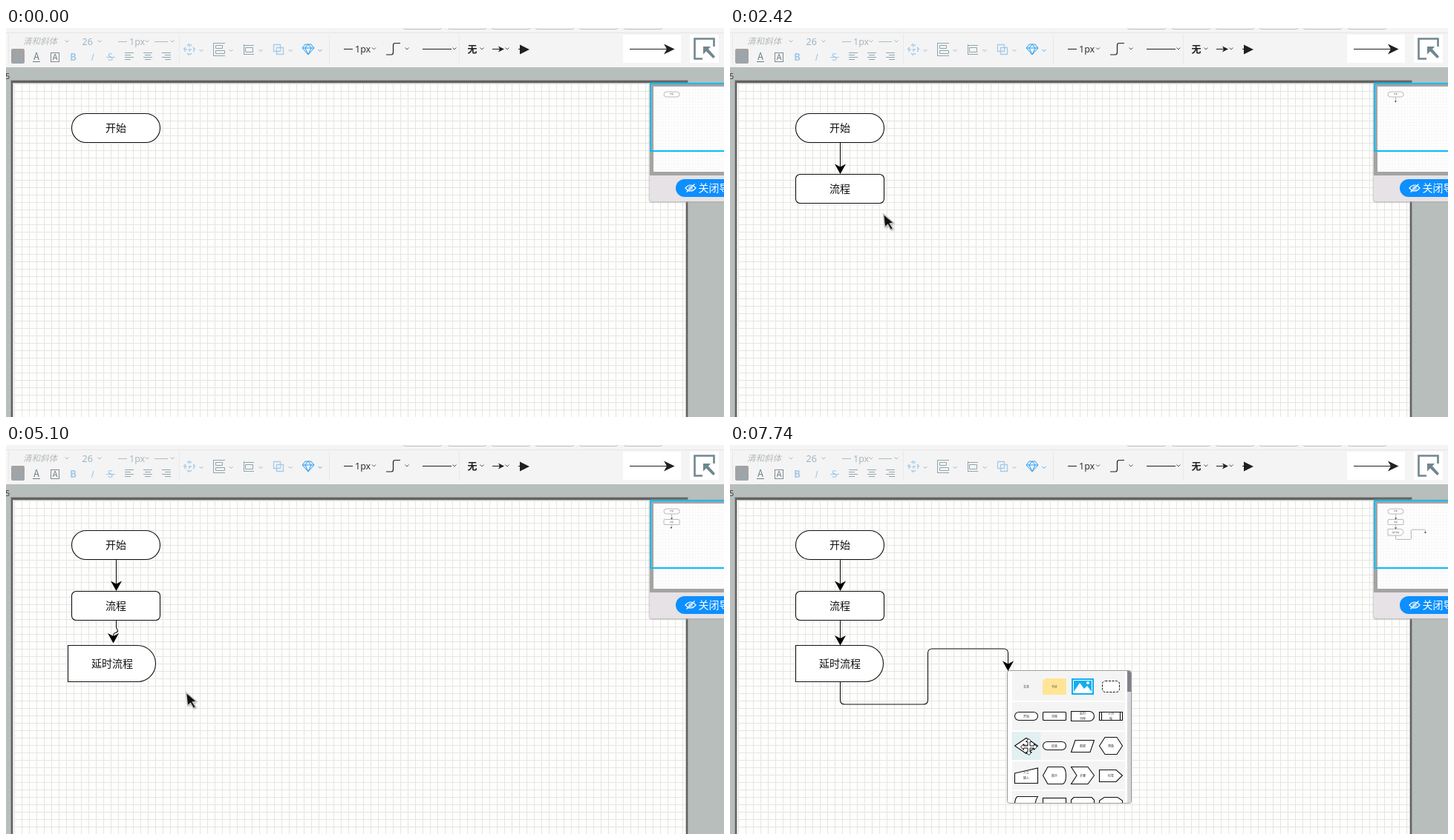
Write an HTML page that moves like this. It is 967 px wide and 525 px high and loops after 8 s.

```html
<!DOCTYPE html>
<html lang="zh-CN">
<head>
<meta charset="utf-8">
<title>Flowchart editor</title>
<style>
html, body { margin: 0; width: 100%; height: 100%; overflow: hidden; background: #b8bebc; }
svg { display: block; }
text { font-family: "Noto Sans CJK SC", "Noto Sans CJK", "Noto Sans", sans-serif; }
.line { fill: none; stroke: #111; stroke-width: 1.1; }
.node { fill: #fff; stroke: #111; stroke-width: 1.1; }
.label { font-size: 14px; text-anchor: middle; fill: #111; }
.hover { fill: none; stroke: #18b4f0; stroke-dasharray: 3 2; }
.anchor { fill: #fff; stroke: #3a7ea8; }
#mini .line, #mini .node { stroke: #999; stroke-width: .7; vector-effect: non-scaling-stroke; }
#mini .label { fill: #555; }
#menu .icon { fill: #fff; stroke: #111; stroke-width: 1.1; }
#menu text { font-size: 4px; text-anchor: middle; fill: #333; }
.pale { fill: none; stroke: #a9bcc8; }
.teal { fill: none; stroke: #8fa5ad; stroke-width: 1; }
.sky { fill: none; stroke: #a5cbe9; stroke-width: 1.3; }
.ink { fill: none; stroke: #231f20; stroke-width: 1.2; }
.en { font-family: "Noto Sans", sans-serif; font-size: 12.5px; }
</style>
</head>
<body>
<svg width="967" height="525" viewBox="0 0 967 525">
  <defs>
    <pattern id="grid" x="11" y="75" width="10" height="10" patternUnits="userSpaceOnUse">
      <path d="M.5 0V10M0 .5H10" stroke="#e5e5e2" fill="none"/>
    </pattern>
    <pattern id="dots" x="872" y="79" width="4" height="4" patternUnits="userSpaceOnUse">
      <path d="M.5 0V4M0 .5H4" stroke="#f8f8f8" fill="none"/>
    </pattern>
    <clipPath id="menuClip"><rect x="0" y="1" width="166" height="178" rx="3"/></clipPath>
    <filter id="soft" x="-50%" y="-50%" width="200%" height="200%"><feGaussianBlur stdDeviation="1"/></filter>
  </defs>

  <!-- page -->
  <rect width="967" height="525" fill="#b8bebc"/>
  <text class="en" x="-1" y="69" style="font-size:11px" fill="#444">5</text>
  <rect x="6" y="70" width="913" height="480" fill="#9a9f9d"/>
  <rect x="7" y="71" width="911" height="480" fill="#606261"/>
  <rect x="9" y="74" width="907" height="480" fill="#c9c9c9"/>
  <rect x="10" y="75" width="905" height="480" fill="#fefefd"/>
  <rect x="11" y="75" width="904" height="480" fill="url(#grid)"/>

  <!-- toolbar -->
  <rect width="967" height="53" fill="#f4f4f4"/>
  <path d="M0 6.5H967" stroke="#e6e6e6"/>
  <path d="M3.5 8V48M233.5 8V48M435.5 8V48M610.5 8V48" stroke="#e9e9e9"/>
  <g id="tabs" fill="#fdfdfd" stroke="#bbb"></g>
  <g id="chevrons" fill="none"></g>
  <text x="23" y="22" font-size="11.5" font-style="italic" fill="#b3b8ba">清和斜体</text>
  <text class="en" x="102.500" y="23" fill="#9db3c2">26</text>
  <text class="en" x="166" y="23" fill="#adb8be">1px</text>
  <path class="pale" d="M151 18.500H163M200 18.500H218"/>
  <rect x="7" y="28" width="18" height="20" rx="2" fill="#a3a3a4"/>
  <path d="M11 38L15 33.500L19 38L15 42.500ZM20.500 40V43M11 44.500H21" fill="none" stroke="#86aecb"/>
  <g class="en" text-anchor="middle">
    <text x="41" y="43" fill="#6c7a82">A</text>
    <text x="66" y="43" style="font-size:11px" fill="#6c7a82">A</text>
    <text x="90.500" y="44" fill="#9fc6e6" font-weight="600">B</text>
    <text x="115.500" y="44" fill="#9fc6e6" font-style="italic">I</text>
    <text x="140.500" y="44" fill="#9fc6e6">S</text>
  </g>
  <path d="M36 45.500H46" stroke="#6c7a82"/>
  <path d="M135 39.500H147" stroke="#9fc6e6"/>
  <rect x="60.500" y="33.500" width="11" height="12" fill="none" stroke="#7d8a91"/>
  <path class="teal" d="M160 33.500H172M160 36.500H168M160 39.500H172M160 42.500H168M185 33.500H197M187 36.500H195M185 39.500H197M187 42.500H195M210 33.500H222M214 36.500H222M210 39.500H222M214 42.500H222"/>
  <path class="sky" d="M244 24L247 21L250 24M244 34L247 37L250 34M242 26L239 29L242 32M252 26L255 29L252 32M247 22V36M240 29H254" stroke-dasharray="4 2"/>
  <path class="teal" d="M279.500 20V38M279 20.500H295M279 37.500H295M282.500 23.500H291.500V27.500H282.500ZM282.500 30.500H294.500V34.500H282.500Z"/>
  <path class="teal" d="M320.500 22V36M320 23.500H334M320 35.500H334M322.500 26.500H332.500V32.500H322.500Z"/>
  <path class="sky" d="M360.500 22.500H369.500V31.500H360.500ZM364.500 26.500H373.500V35.500H364.500Z"/>
  <path d="M403 22H411L415 27L407 36L399 27ZM399 27H415M403 27L407 36L411 27L407 22L403 27" fill="#d8efff" stroke="#2d9cf0"/>
  <path class="ink" d="M455 28.500H467M512 36H519Q521.500 36 521.500 33V23Q521.500 20.500 524 20.500H531M561 28.500H600M655 28.500H668M690 28.500H695"/>
  <path d="M671 28.500L663 24.500L665 28.500L663 32.500ZM705 29L692 22.500V35.500Z" fill="#231f20"/>
  <text class="en" x="470" y="33" fill="#333">1px</text>
  <text x="621.500" y="33" font-size="13" font-weight="700" fill="#222">无</text>
  <path d="M831 9H909V47H831ZM921 9H960V47H921Z" fill="#fff"/>
  <path d="M840 28.500H892" class="ink"/>
  <path d="M900.500 28.500L886 21.500L890 28.500L886 35.500Z" fill="#231f20"/>
  <path d="M953.500 25V14.500H927.500V41.500H938" fill="none" stroke="#71868f" stroke-width="2.600"/>
  <path d="M939 25H949L946 28.500L955 38.500L952.500 41L943 31.500L939 35.500Z" fill="#71868f"/>

  <!-- diagram -->
  <g id="main"></g>

  <!-- navigator -->
  <rect x="866.500" y="74" width="120" height="161" rx="3" fill="#aaa" filter="url(#soft)"/>
  <rect x="867" y="74" width="120" height="160" rx="3" fill="#e6e2e5"/>
  <path d="M867 76H967V199H867Z" fill="#a5a4a5"/>
  <rect x="872" y="79" width="95" height="115" fill="#fff"/>
  <rect x="872" y="79" width="95" height="115" fill="url(#dots)"/>
  <g id="mini" transform="translate(870.5 65.8) scale(.176)"></g>
  <rect x="868" y="75" width="110" height="91" fill="none" stroke="#05bdf5" stroke-width="2"/>
  <rect x="902" y="204" width="100" height="24" rx="12" fill="#0c8fff"/>
  <path d="M915 216Q922 208 929 216Q922 224 915 216ZM916.500 221.500L927.500 210.500" fill="none" stroke="#fff" stroke-width="1.200"/>
  <circle cx="922" cy="216" r="2.200" fill="none" stroke="#fff"/>
  <text x="932.500" y="221" font-size="14" fill="#fff">关闭导航</text>

  <!-- shape menu -->
  <g id="menu">
    <rect x=".5" y=".5" width="167" height="179" rx="3" fill="#fff" stroke="#999"/>
    <g clip-path="url(#menuClip)" transform="translate(1 0)">
      <path d="M6 2H158V41H6ZM6 43H158V81H6ZM6 83H158V121H6ZM6 123H158V161H6ZM6 163H158V180H6Z" fill="#f4f4f4"/>
      <rect id="pick" width="39" height="38" fill="#e2f0f2"/>
      <rect x="161" y="0" width="6" height="180" fill="#d9d9dc"/>
      <rect x="161" y="1" width="6" height="28" fill="#80808a"/>
      <path d="M51 11H79V33H47V15Z" fill="#ffe595"/>
      <rect x="86" y="11" width="30" height="22" fill="#10aef0"/>
      <path d="M88.500 13.500H113.500V30.500H88.500Z" fill="none" stroke="#fff"/>
      <path d="M89 29L97 17L103 25L107 21L113 29V30H89Z" fill="#fff"/>
      <circle cx="108" cy="17" r="2" fill="#fff"/>
      <rect x="127.500" y="14.500" width="23" height="15" rx="4" fill="#fff" stroke="#111" stroke-dasharray="3 1.500"/>
      <g class="icon">
        <rect x="9.500" y="56.500" width="31" height="11" rx="5.500"/>
        <rect x="47.500" y="56.500" width="31" height="11" rx="1"/>
        <path d="M85.500 55.500H110A6.500 6.500 0 0 1 110 68.500H85.500Z"/>
        <path d="M123.500 56.500H154.500V67.500H123.500ZM126.500 56V68M151.500 56V68"/>
        <path d="M9.500 102L25 91.500L40.500 102L25 112.500Z"/>
        <rect x="47.500" y="96.500" width="31" height="11" rx="5.500"/>
        <path d="M91 94.500H116.500L111 110.500H85.500Z"/>
        <path d="M123.500 102L131 90.500H147L154.500 102L147 113.500H131Z"/>
        <path d="M9.500 139L40.500 132V152.500H9.500Z"/>
        <path d="M47.500 142L54 130.500H74Q78.500 132 78.500 142Q78.500 152 74 153.500H54Z"/>
        <path d="M85.500 130.500H108L116.500 142L108 153.500H85.500L93 142Z"/>
        <path d="M123.500 134.500H146L154.500 142L146 150.500H123.500Z"/>
        <path d="M13 170.500H40.500Q37 175 37 182H9.500Q9.500 173 13 170.500Z"/>
        <rect x="47.500" y="172.500" width="31" height="20"/>
        <path d="M85.500 185V175L89 171.500H113L116.500 175V185Z"/>
        <path d="M123.500 185V176L130 171.500H148L154.500 176V185Z"/>
      </g>
      <g id="names"></g>
    </g>
  </g>

  <!-- pointers -->
  <g id="arrow">
    <path d="M3 3L5 21L9 17.500L13 24L16 22.500L12 16L17 15Z" fill="#777" opacity=".5" filter="url(#soft)"/>
    <path d="M1.500 1L3.500 19L7.500 15.500L11.500 22.500L14.500 20.500L10.500 14L15.500 13Z" fill="#111" stroke="#c4c4be" stroke-width="1.500"/>
  </g>
  <path id="cross" d="M0 -11L4 -7H1.500V-1.500H7V-4L11 0L7 4V1.500H1.500V7H4L0 11L-4 7H-1.500V1.500H-7V4L-11 0L-7 -4V-1.500H-1.500V-7H-4Z" fill="#fff" stroke="#111"/>
</svg>
<script>
const LOOP = 8000;
const $ = id => document.getElementById(id);

// toolbar repeats
$("tabs").innerHTML = [535, 595, 654, 713, 772, 832]
  .map(x => `<rect x="${x + .5}" y="-6.5" width="51" height="8" rx="2"/>`).join("");
const chevrons = (color, y, xs) => xs
  .map(x => `<path d="M${x - 2.5} ${y - 1.5}l2.5 2.500l2.500 -2.500" stroke="${color}"/>`).join("");
$("chevrons").innerHTML = chevrons("#a9b4ba", 18, [82, 126, 190, 224])
  + chevrons("#a9b4ba", 30.5, [263, 303, 343, 383])
  + chevrons("#4aa9f0", 30.5, [423])
  + chevrons("#555", 28, [495.5, 540, 604, 641, 675]);

// menu captions, row by row
const captions = ["文本", "卡片", "", "", "开始", "流程", "延时 流程", "子流 程",
  "条件", "结束", "数据", "预备", "人工 输入", "展示", "步骤", "标签"];
$("names").innerHTML = captions.map((s, i) => {
  const words = s.split(" "), x = 25 + i % 4 * 38, y = 23.5 + (i >> 2) * 40;
  return words.map((w, k) => `<text x="${x}" y="${y + (k - (words.length - 1) / 2) * 7}">${w}</text>`).join("");
}).join("");

// diagram pieces
const label = (s, x, y) => `<text class="label" x="${x}" y="${y + 5}">${s}</text>`;
const link = (d, x, y) => `<path class="line" d="${d}"/>`
  + `<path d="M${x} ${y}l-7.500 -13.500l7.500 4l7.500 -4z" fill="#000"/>`;
const box = (x, y, w, h, r) => `<rect class="node" x="${x}" y="${y}" width="${w}" height="${h}" rx="${r}"/>`;
const process = box(88.5, 197.5, 119, 39, 6) + label("流程", 148, 217);
const delay = x => `<path class="node" d="M${x + .5} 270.5H${x + 94}a24.500 24.500 0 0 1 0 49H${x + .5}Z"/>`
  + label("延时流程", x + 60, 295);
const anchors = (y, h) => [[148, y], [208, y + h / 2], [148, y + h], [88, y + h / 2]]
  .map(([x, y]) => `<circle class="anchor" cx="${x}" cy="${y}" r="2.5"/>`).join("");
const elbow = (mid, top, x) => link(
  `M148.5 320V344q0 6 6 6H${mid - 6}q6 0 6 -6V${top + 6}q0 -6 6 -6H${x - 6}q6 0 6 6V${top + 22}`, x, top + 30);

// [from, to, markup, navigator from, navigator to]
const parts = [
  [0, LOOP, box(88.5, 115.5, 119, 39, 19.5) + label("开始", 148, 135), 0, LOOP],
  [1330, 2420, link("M148.5 155L147.5 188", 147, 197), 1600, 2680],
  [2420, LOOP, link("M148.5 155V188", 148.5, 197), 2680, LOOP],
  [2420, 2950, process, 2680, LOOP],
  [2950, 3230, box(89.5, 198.5, 118, 37, 6) + label("流程", 149, 218)
    + `<rect class="hover" x="88.5" y="197.5" width="119" height="39"/>`],
  [3230, LOOP, process],
  [3490, 5880, link("M148.5 237V246L150.5 251Q150 253 147 253.500Q144.500 254 144.500 258", 144.5, 267.5), 4300, 5880],
  [5880, LOOP, link("M148.5 237V261", 148.5, 270.5), 5880, LOOP],
  [5100, 5880, delay(83), 5360, 5880],
  [5880, LOOP, delay(88), 5880, LOOP],
  [6150, 6410, link("M148.5 320V339", 148.5, 348)],
  [6410, 6680, elbow(257.5, 276.5, 357.5)],
  [6680, LOOP, elbow(266.5, 275, 374.5), 7220, LOOP],
  [1070, 1330, anchors(115, 40)],
  [3230, 3490, anchors(197, 40)],
  [6150, 6410, anchors(270, 50)],
];

const spans = [];
function add(parent, html, from, to) {
  if (!(to > from)) return;
  const g = document.createElementNS("http://www.w3.org/2000/svg", "g");
  g.innerHTML = html;
  parent.append(g);
  spans.push({ g, from, to });
}
for (const [from, to, html, miniFrom, miniTo] of parts) {
  add($("main"), html, from, to);
  add($("mini"), html, miniFrom, miniTo);
}

// [from, to, x, y, time of highlight, column, row]
const menus = [
  [1600, 2420, 146, 196, LOOP, 0, 0],
  [4300, 5100, 142, 269, 4820, 2, 1],
  [7220, LOOP, 373, 304, 7740, 0, 2],
];

// [time, pointer, x, y]
const moves = [
  [0, ""], [260, "arrow", 178, 235], [530, "arrow", 143, 171],
  [800, "cross", 143.5, 153.5], [1070, "cross", 147.5, 155.5],
  [1330, "arrow", 145, 195], [1600, "arrow", 149, 204],
  [1870, "arrow", 212, 246], [2150, "arrow", 148, 352],
  [2420, "arrow", 205, 250], [2680, "arrow", 140, 238],
  [2950, "cross", 143.5, 232.5], [3230, "cross", 147.5, 238.5],
  [3490, "arrow", 144, 267], [3760, "arrow", 145, 274],
  [4030, "arrow", 145, 281], [4300, "arrow", 146, 283],
  [4560, "arrow", 200, 318], [4820, "cross", 243.5, 333.5],
  [5100, "arrow", 241, 333], [5360, "arrow", 200, 322],
  [5620, "cross", 146.5, 304.5], [5880, "cross", 150.5, 310.5],
  [6150, "arrow", 148, 348], [6410, "arrow", 357, 304],
  [6680, "arrow", 375, 303], [6950, "arrow", 395, 319],
  [7220, "arrow", 396, 330], [7480, "arrow", 398, 376],
  [7740, "cross", 402.5, 407.5],
];

const show = (el, on) => { el.style.display = on ? "" : "none"; };
const place = (el, x, y) => el.setAttribute("transform", `translate(${x} ${y})`);

function draw(t) {
  for (const s of spans) show(s.g, t >= s.from && t < s.to);

  const menu = menus.find(m => t >= m[0] && t < m[1]);
  show($("menu"), menu);
  if (menu) {
    const [, , x, y, pickAt, col, row] = menu;
    place($("menu"), x, y);
    show($("pick"), t >= pickAt);
    place($("pick"), 5.5 + col * 38, 3 + row * 40);
  }

  const [, kind, x, y] = moves.findLast(m => m[0] <= t);
  for (const id of ["arrow", "cross"]) show($(id), id === kind);
  if (kind) place($(kind), x, y);
}

const t0 = performance.now();
function tick() {
  draw((performance.now() - t0) % LOOP);
  requestAnimationFrame(tick);
}
tick();
</script>
</body>
</html>
```
